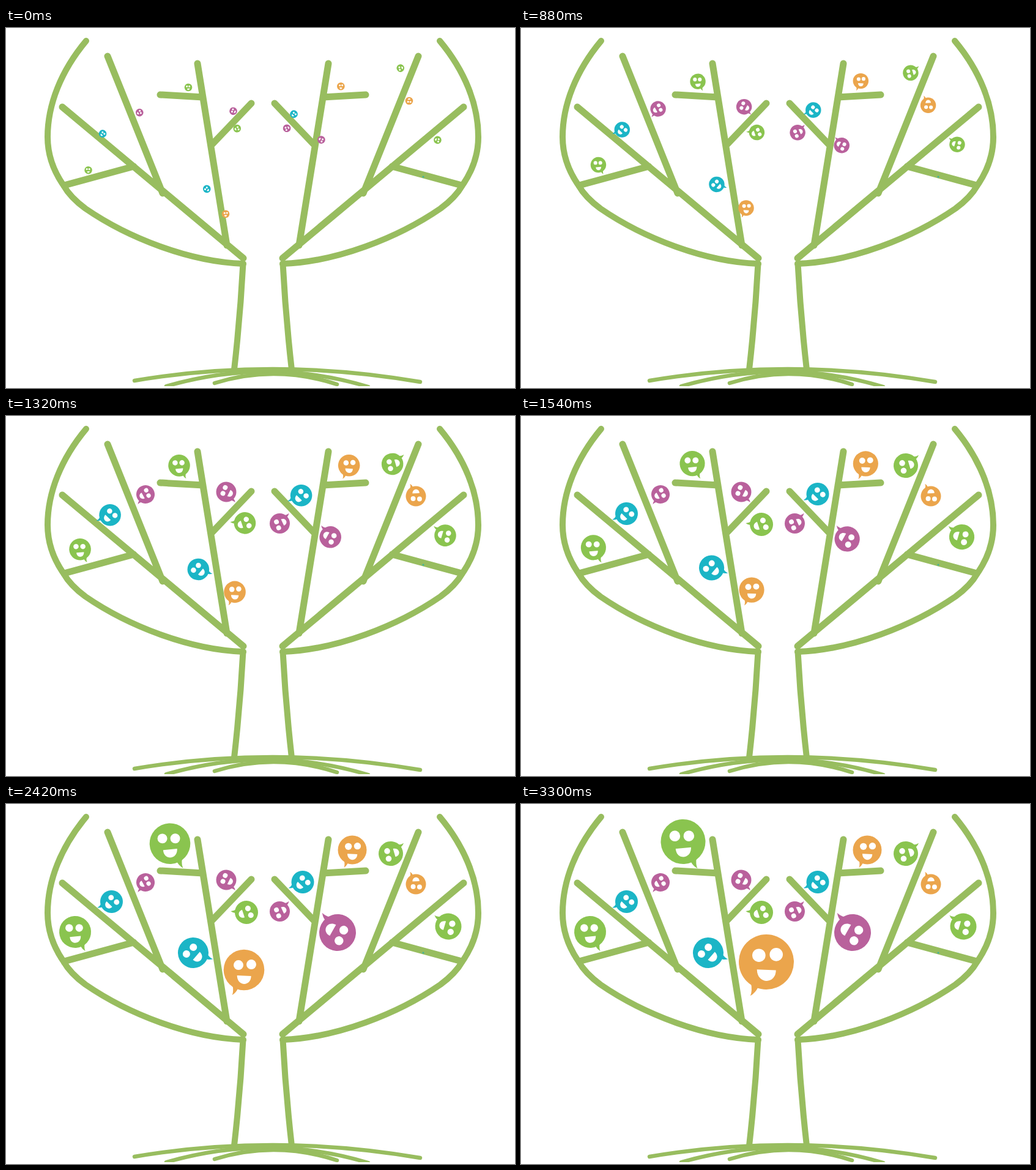
An HTML page for the animation above (6.6 s loop, 832x588 px).

```html
<!DOCTYPE html>
<html lang="en">
<head>
<meta charset="utf-8">
<title>Smiling tree</title>
<style>
  html, body { margin: 0; width: 100%; height: 100%; overflow: hidden; background: #fff; }
  svg { display: block; width: 832px; height: 588px; }
  .wood { fill: none; stroke: #98bd5f; stroke-width: 11; stroke-linecap: round; stroke-linejoin: round; }
  .bough, .trunk { stroke-width: 10; }
  .trunk { stroke-linecap: butt; }
  .ground { stroke-width: 6.5; }
  .hole { fill: #fff; }
</style>
</head>
<body>
<svg viewBox="0 0 832 588">
  <defs>
    <clipPath id="floor"><path d="M0 0H832V585H0Z"/></clipPath>
    <g id="half">
      <path class="bough" d="M131 21C90 70 68 125 68 178C68 208 78 234 94 257C103 273 115 284 130 295C200 343 300 382 388 385"/>
      <path d="M92 129L388 376M95 257L209 226M166 46L256 270M313 58L361 355M252 109L322 113M401 123L337 190"/>
      <path class="trunk" d="M387.500 385Q383 470 373 558"/>
    </g>
    <!-- unit-radius speech bubble -->
    <g id="bubble">
      <path class="tail" d="M-.56 .75Q-.5 1.05 -.58 1.23Q-.4 1.12 -.3 .92Z"/>
      <circle r="1"/>
      <g class="hole">
        <circle cx="-.27" cy="-.24" r=".24"/>
        <circle cx=".36" cy="-.27" r=".24"/>
        <path d="M-.34 .27L.35 .3C.34 .83 -.34 .81 -.34 .27Z"/>
      </g>
    </g>
  </defs>
  <g class="wood" clip-path="url(#floor)">
    <use href="#half"/>
    <use href="#half" transform="translate(840) scale(-1 1)"/>
    <g class="ground">
      <path d="M210 576Q440 537 677 578"/>
      <path d="M262 585Q430 537 592 586"/>
      <path d="M341 580Q440 549 541 582"/>
    </g>
  </g>
  <circle cx="682" cy="243" r="1.500" fill="#3fb39a"/>
  <g id="faces"></g>
</svg>
<script>
const STEP = 220, LOOP = 6600, LAST = 14, SEED = 6.3, TAIL = 115;
const GREEN = '#8ac44f', PURPLE = '#b9619c', BLUE = '#1bb5c6', ORANGE = '#eba54c';
const layer = document.getElementById('faces');
const bubble = document.getElementById('bubble');
const faces = [];

// (x, y) and size are the full-grown centre and radius, aim the tail's angle.
// The seed sits toward the corner the tail points at.
function face(color, aim, flip, x, y, size) {
  const node = bubble.cloneNode(true);
  node.removeAttribute('id');
  node.setAttribute('fill', color);
  layer.append(node);
  const angle = aim * Math.PI / 180;
  const shift = t => (Math.sign(t) + 0.2 * t) * (size - SEED);
  faces.push({
    node, x, y, size,
    tail: node.querySelector('.tail'),
    turn: aim - (flip ? 180 - TAIL : TAIL),
    side: flip ? -1 : 1,
    dx: shift(Math.cos(angle)),
    dy: shift(Math.sin(angle)),
    end: Math.round(size / 3.2)
  });
}

face(GREEN, 62, true, 113, 209, 26);
face(BLUE, 157, false, 172.5, 159.5, 18.5);
face(PURPLE, 128, true, 228, 128, 15);
face(GREEN, 62, true, 265, 61.5, 36.5);
face(PURPLE, 49, false, 360, 124, 16.5);
face(GREEN, 184, false, 393, 177, 19);
face(BLUE, 18, true, 306, 243, 25);
face(ORANGE, 115, false, 401, 258, 45);
face(BLUE, 157, false, 485, 127.5, 18.5);
face(PURPLE, -48, true, 447.5, 175.5, 16.5);
face(ORANGE, 115, false, 566, 75, 23.5);
face(GREEN, -39, true, 629, 81, 20);
face(ORANGE, -115, true, 670, 131, 16.5);
face(PURPLE, -128, false, 542, 210, 30);
face(GREEN, -141, false, 723, 200, 21.5);

// Growth pauses for one beat after the third pose.
function stageAt(ms) {
  const beat = Math.floor((ms % LOOP) / STEP);
  return Math.min(beat < 3 ? beat : beat - 1, LAST);
}

function draw(stage) {
  const grown = SEED + 1.9 * stage + 0.08 * stage * stage;
  for (const f of faces) {
    const left = Math.max(0, 1 - stage / f.end);
    const r = left ? Math.min(f.size, grown) : f.size;
    const x = f.x + f.dx * left, y = f.y + f.dy * left;
    f.node.setAttribute('transform', `translate(${x} ${y}) rotate(${f.turn}) scale(${r * f.side} ${r})`);
    f.tail.setAttribute('visibility', stage ? 'visible' : 'hidden');
  }
}

const start = performance.now();
function tick() {
  draw(stageAt(performance.now() - start));
  requestAnimationFrame(tick);
}
tick();
</script>
</body>
</html>
```
